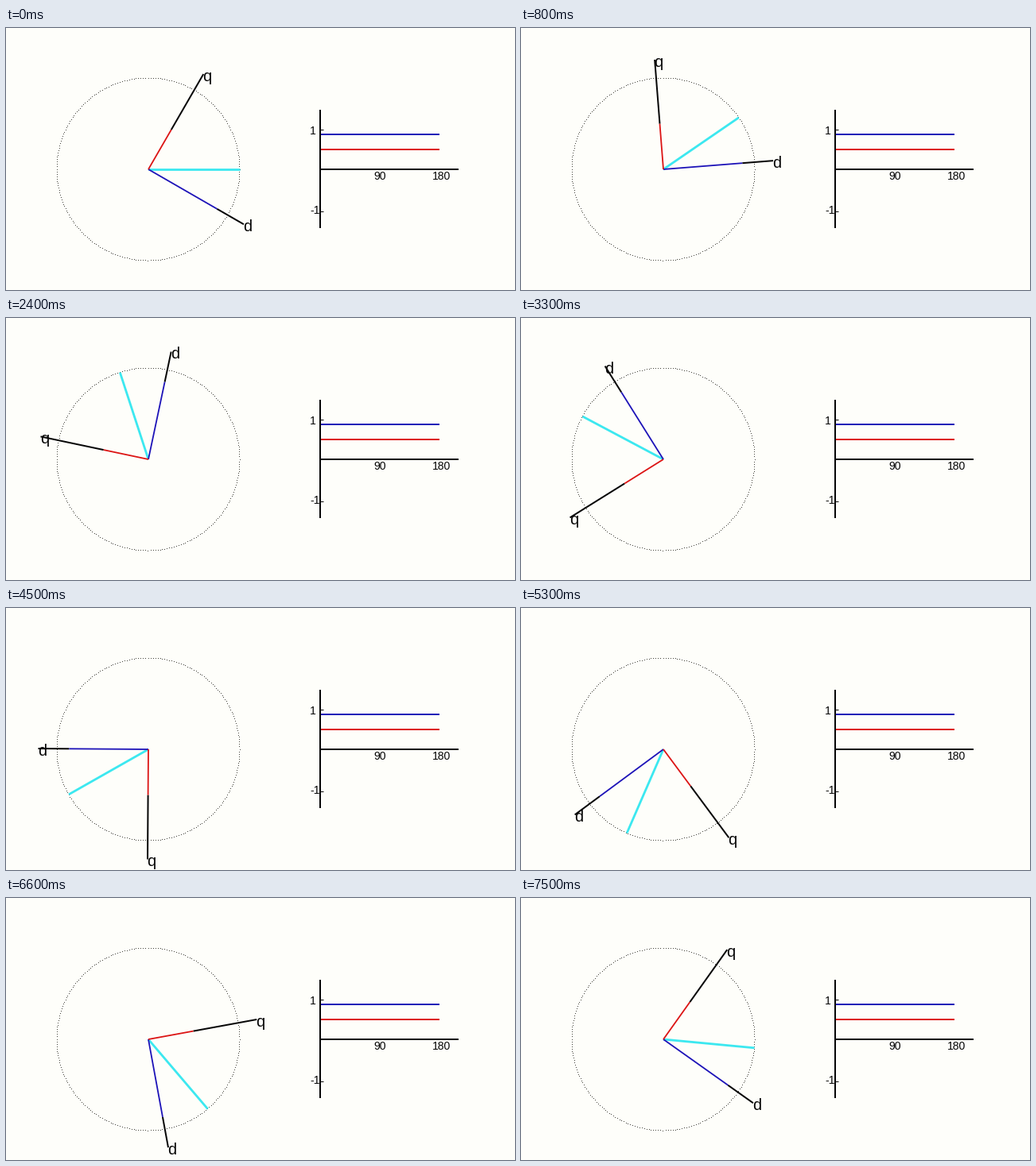
These frames come from a looping animation (640 by 330 pixels, 7600 ms). A matplotlib script:

```python
import numpy as np
import matplotlib.pyplot as plt
from matplotlib.animation import FuncAnimation

W, H, DPI = 640, 330, 80
PX = 72 / DPI  # points per pixel
FRAMES, STEP = 76, 100

CX, CY = 179, 178
RADIUS, AXIS = 115, 138.5
OFFSET = 30  # the vector leads the d axis by this angle

BG, INK = "#fefefa", "#060606"
BLUE, RED, CYAN = "#1c12b8", "#dc1414", "#3ce8f0"

# The rotation speed drifts slightly over one turn.
KEY_STEPS = [0, 16, 33, 45, 53, 66, 75, 76]
KEY_ANGLES = [0, 69, 152, 209.6, 246.5, 310.4, 354.6, 360]

plt.rcParams["font.family"] = "Liberation Sans"
fig = plt.figure(figsize=(W / DPI, H / DPI), dpi=DPI, facecolor=BG)
ax = fig.add_axes([0, 0, 1, 1])
ax.set(xlim=(0, W), ylim=(H, 0))
ax.axis("off")


def line(xs, ys, color, width=2.0):
    return ax.plot(xs, ys, color=color, lw=width * PX,
                   solid_capstyle="butt")[0]


def label(x, y, text, size, **kw):
    return ax.text(x, y, text, fontsize=size * PX, color=INK, **kw)


def polar(radius, degrees):
    a = np.radians(degrees)
    return CX + radius * np.cos(a), CY - radius * np.sin(a)


def draw_circle():
    x, y = polar(RADIUS, np.arange(0, 360, 1.5))
    ax.plot(np.floor(x) - 0.5, np.floor(y) + 0.5, ",", color="#484840")


def draw_chart():
    line([396, 545], [134, 134], BLUE)
    line([396, 545], [153, 153], RED)
    line([395, 395], [103, 252], INK)
    line([394, 569], [178, 178], INK)
    for y in (127.5, 230.5):
        line([395, 399], [y, y], INK, 1)
    label(390, 134, "1", 14, ha="right")
    label(394.5, 234.5, "-1", 14, ha="right")
    label(470, 191, "90", 14, ha="center")
    label(547.5, 191, "180", 14, ha="center")


class Arm:
    """A rotating axis with a coloured component and a name at its tip."""

    def __init__(self, name, color, share, lead):
        self.length = RADIUS * share
        self.lead = lead
        self.rod = line([], [], INK)
        self.part = line([], [], color, 1.8)
        self.name = label(0, 0, name, 20)

    def turn(self, angle):
        a = angle + self.lead
        tip, joint = polar(AXIS, a), polar(self.length, a)
        aim(self.rod, tip, joint)
        aim(self.part, joint)
        self.name.set_position((tip[0] - 0.8, tip[1] + 9))


def aim(artist, tip, start=(CX, CY)):
    artist.set_data([start[0], tip[0]], [start[1], tip[1]])


draw_circle()
draw_chart()
vector = line([], [], CYAN, 2.8)
cos_part = np.cos(np.radians(OFFSET))
sin_part = np.sin(np.radians(OFFSET))
arms = [Arm("d", BLUE, cos_part, -OFFSET),
        Arm("q", RED, sin_part, 90 - OFFSET)]


def update(i):
    angle = np.interp(i, KEY_STEPS, KEY_ANGLES)
    aim(vector, polar(RADIUS, angle))
    for arm in arms:
        arm.turn(angle)
    return []


anim = FuncAnimation(fig, update, frames=FRAMES, interval=STEP,
                     repeat=True, repeat_delay=0, blit=False)
plt.show()
```
